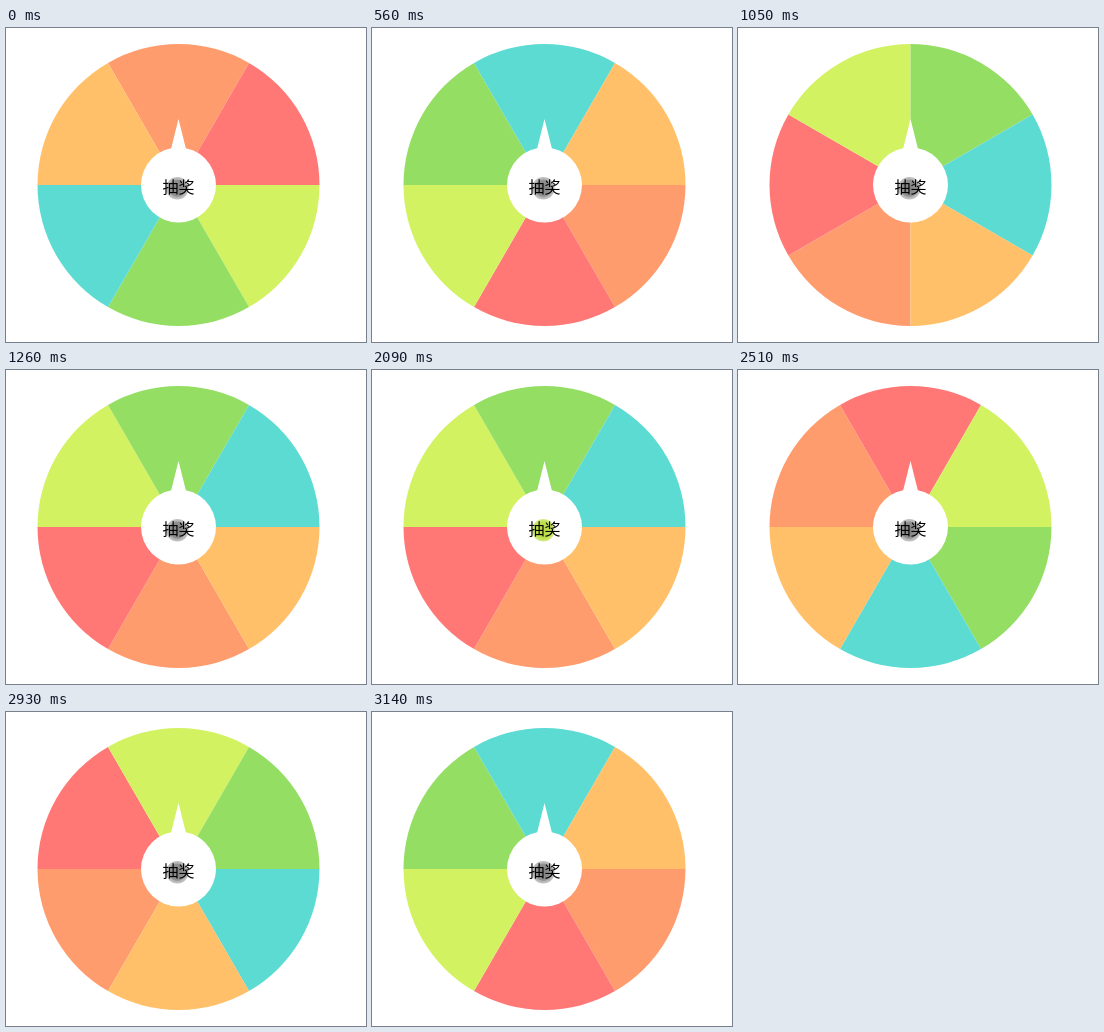
An HTML page for the animation above (3.77 s loop, 360x314 px).

```html
<!DOCTYPE html>
<html lang="zh">
<head>
<meta charset="utf-8">
<title>抽奖</title>
<style>
  html, body { margin: 0; width: 100%; height: 100%; overflow: hidden; background: #fff; }
  svg { display: block; width: 100%; height: 100%; }
  text { font: 16px "Noto Sans CJK SC", "Noto Sans CJK", sans-serif; text-anchor: middle; }
</style>
</head>
<body>
<svg viewBox="0 0 360 314">
  <defs>
    <radialGradient id="shade">
      <stop offset="0" stop-color="#808080"/>
      <stop offset=".72" stop-color="#929292"/>
      <stop offset=".8" stop-color="#b4b4b4"/>
      <stop offset="1" stop-color="#c4c4c4"/>
    </radialGradient>
    <radialGradient id="glow">
      <stop offset="0" stop-color="#b5d64a"/>
      <stop offset=".75" stop-color="#bfe050"/>
      <stop offset="1" stop-color="#d9ec92"/>
    </radialGradient>
  </defs>
  <g transform="translate(172.5 157)">
    <g id="wheel"></g>
    <path d="M0-66L7.5-36H-7.5Z" fill="#fff"/>
    <circle r="37.5" fill="#fff"/>
  </g>
  <circle id="mouse" cx="171.3" cy="160.2" r="11.3"/>
  <text x="172.5" y="164.5">抽奖</text>
</svg>
<script>
  const LOOP = 3770, STEP = 70, TICK_DEG = 30, RADIUS = 141;
  const COLORS = ["#ff9c6e", "#ff7875", "#d3f261", "#95de64", "#5cdbd3", "#ffc069"];
  // press: button goes down; release: wheel becomes visible in motion
  const SPINS = [
    { press: 140, release: 350, start: 266, tick: 18.2, ticks: 54 },
    { press: 2090, release: 2230, start: 2206, tick: 19, ticks: 46 }
  ];
  const wheel = document.getElementById("wheel");
  const mouse = document.getElementById("mouse");

  const point = deg => {
    const a = deg * Math.PI / 180;
    return `${(RADIUS * Math.sin(a)).toFixed(3)} ${(-RADIUS * Math.cos(a)).toFixed(3)}`;
  };

  wheel.innerHTML = COLORS.map((color, i) =>
    `<path fill="${color}" d="M0 0L${point(i * 60 - 30)}A${RADIUS} ${RADIUS} 0 0 1 ${point(i * 60 + 30)}Z"/>`
  ).join("");

  function ticksAt(spin, t) {
    if (t < spin.release) return 0;
    const shown = spin.release + Math.floor((t - spin.release) / STEP) * STEP;
    return Math.min(spin.ticks, Math.floor((shown - spin.start) / spin.tick));
  }

  function draw(t) {
    const ticks = SPINS.reduce((sum, spin) => sum + ticksAt(spin, t), 0);
    const down = SPINS.some(spin => t >= spin.press && t < spin.release);
    wheel.setAttribute("transform", `rotate(${ticks * TICK_DEG % 360})`);
    mouse.setAttribute("fill", down ? "url(#glow)" : "url(#shade)");
  }

  const begin = performance.now();
  function frame() {
    draw((performance.now() - begin) % LOOP);
    requestAnimationFrame(frame);
  }
  frame();
</script>
</body>
</html>
```
